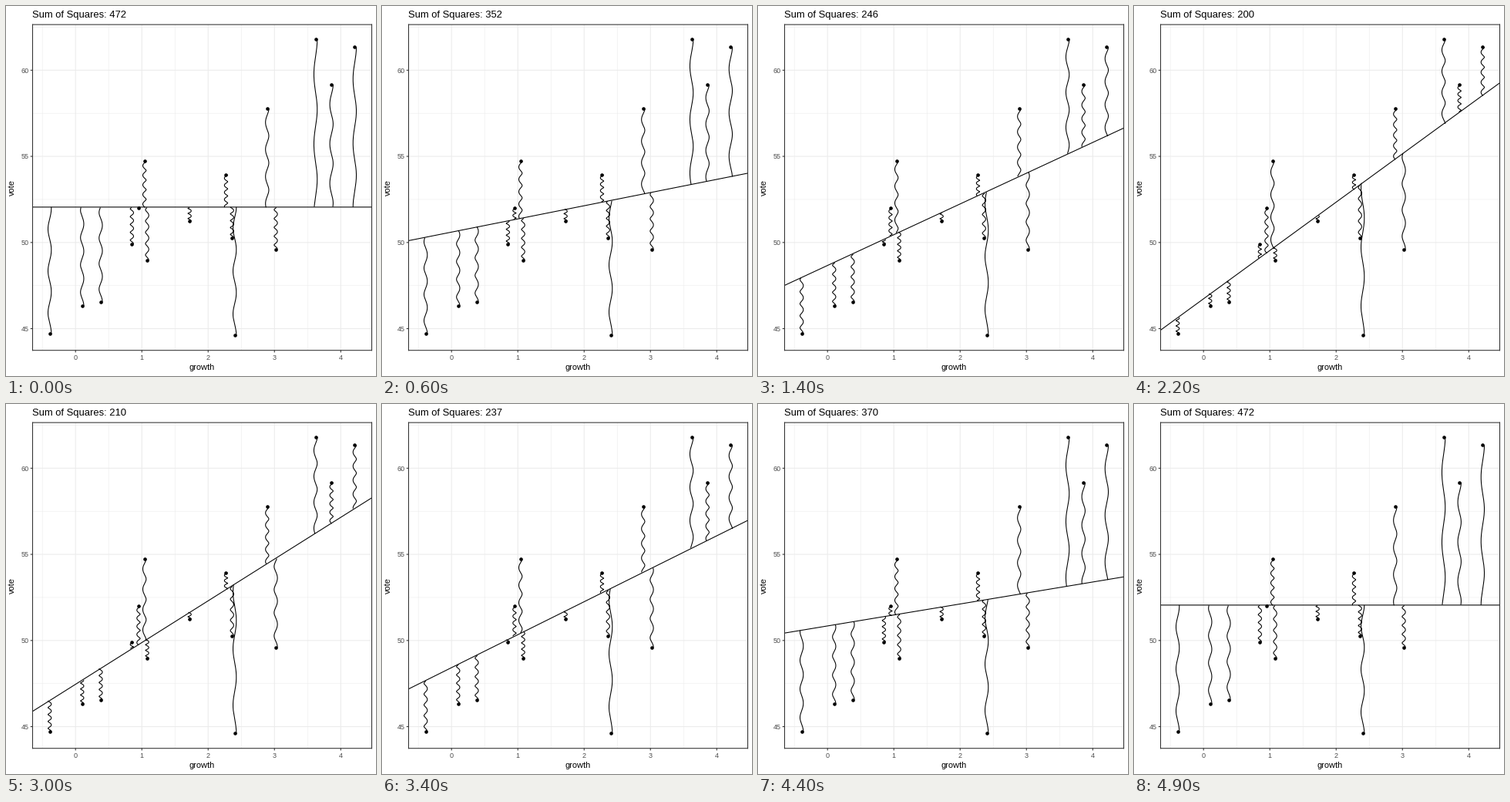
These frames come from a looping animation (480 by 480 pixels, 5000 ms). A matplotlib script:

```python
import numpy as np
import matplotlib.pyplot as plt
from matplotlib.animation import FuncAnimation

SIZE, DPI = 480, 72          # at 72 dpi one point is one pixel
STEPS = 25                   # frames for one sweep of the slope
LEFT, RIGHT, TOP, BOTTOM = 34.5, 474.5, 24.1, 446.7
DIAMETER = 0.05
LINE = 1.07

growth = np.array([2.40, 2.89, 0.85, 4.21, 3.02, 3.62, 1.08, -0.39,
                   3.86, 2.27, 0.38, 1.04, 2.36, 1.72, 0.10, 0.95])
vote = np.array([44.60, 57.76, 49.91, 61.34, 49.60, 61.79, 48.95, 44.70,
                 59.17, 53.94, 46.55, 54.74, 50.27, 51.24, 46.32, 52.00])
mean_x, mean_y = growth.mean(), vote.mean()
best_slope = np.polyfit(growth, vote, 1)[0]


def padded(lo, hi):
    pad = 0.05 * (hi - lo)
    return lo - pad, hi + pad


def spring(x, y, yend):
    """Coil from (x, y) to (x, yend); longer springs are looser."""
    gap = yend - y
    wavelength = 0.27 + 0.04 * gap ** 2
    turns = abs(gap) / wavelength
    t = np.linspace(0, 1, max(2, int(50 * turns)))
    angle = 2 * np.pi * turns * t
    return (x + DIAMETER / 2 * np.cos(angle),
            y + gap * t + DIAMETER / 2 * np.sin(angle))


plt.rcParams["font.family"] = "Liberation Sans"
fig = plt.figure(figsize=(SIZE / DPI, SIZE / DPI), dpi=DPI, facecolor="white")
ax = fig.add_axes([LEFT / SIZE, 1 - BOTTOM / SIZE,
                   (RIGHT - LEFT) / SIZE, (BOTTOM - TOP) / SIZE])
xlim = padded(growth.min() - DIAMETER / 2, growth.max() + DIAMETER / 2)
ylim = padded(vote.min(), vote.max())
ax.set(xlim=xlim, ylim=ylim, xticks=[], yticks=[])
for side in ax.spines.values():
    side.set(color="#333333", linewidth=LINE, snap=False, zorder=5)


def label(x, y, text, size, color="black", **kw):
    """Text placed in pixels from the top left corner."""
    return fig.text(x / SIZE, 1 - y / SIZE, text, fontsize=size, color=color, **kw)


def grid(values, draw, width):
    for v in values:
        draw(v, color="#ebebeb", lw=width, zorder=0, snap=False)


def tick(xs, ys):
    ax.plot(xs, ys, color="#333333", lw=LINE, transform=px, clip_on=False,
            snap=False, solid_capstyle="butt", zorder=1)


x_major, y_major = range(5), range(45, 61, 5)
grid(np.arange(-0.5, 4.4), ax.axvline, LINE / 2)
grid(np.arange(47.5, 62.6, 5), ax.axhline, LINE / 2)
grid(x_major, ax.axvline, LINE)
grid(y_major, ax.axhline, LINE)

px = fig.dpi_scale_trans.frozen()
px = type(px)().scale(1, -1).translate(0, SIZE)
for v in x_major:
    x = LEFT + (v - xlim[0]) / (xlim[1] - xlim[0]) * (RIGHT - LEFT)
    tick([x, x], [BOTTOM, BOTTOM + 2.75])
    label(x, 458.7, str(v), 9, "#4d4d4d", ha="center", va="baseline")
for v in y_major:
    y = BOTTOM - (v - ylim[0]) / (ylim[1] - ylim[0]) * (BOTTOM - TOP)
    tick([LEFT - 2.75, LEFT], [y, y])
    label(29.5, y + 3.2, str(v), 9, "#4d4d4d", ha="right", va="baseline")

label((LEFT + RIGHT) / 2, 472, "growth", 11, ha="center", va="baseline")
label(13.3, (TOP + BOTTOM) / 2, "vote", 11, ha="right", va="center",
      rotation=90, rotation_mode="default")
title = label(LEFT - 0.5, 15, "", 13, ha="left", va="baseline")

coils, = ax.plot([], [], color="black", lw=LINE, solid_capstyle="butt",
                 snap=False, zorder=2)
fit, = ax.plot([], [], color="black", lw=LINE, snap=False, zorder=3)
ax.plot(growth, vote, "o", color="black", ms=4.6, mew=0, zorder=4, snap=False)


def update(frame):
    step = min(frame, 2 * STEPS - 1 - frame)
    slope = best_slope * step / (STEPS - 1)
    fitted = mean_y + slope * (growth - mean_x)

    xs, ys = [], []
    for x, y, yend in zip(growth, vote, fitted):
        sx, sy = spring(x, y, yend)
        xs += [*sx, np.nan]
        ys += [*sy, np.nan]
    coils.set_data(xs, ys)

    ends = np.array(xlim)
    fit.set_data(ends, mean_y + slope * (ends - mean_x))
    title.set_text(f"Sum of Squares: {np.sum((vote - fitted) ** 2):.0f}")
    return coils, fit, title


anim = FuncAnimation(fig, update, frames=2 * STEPS, interval=100,
                     repeat=True, repeat_delay=0, blit=False)
plt.show()
```
